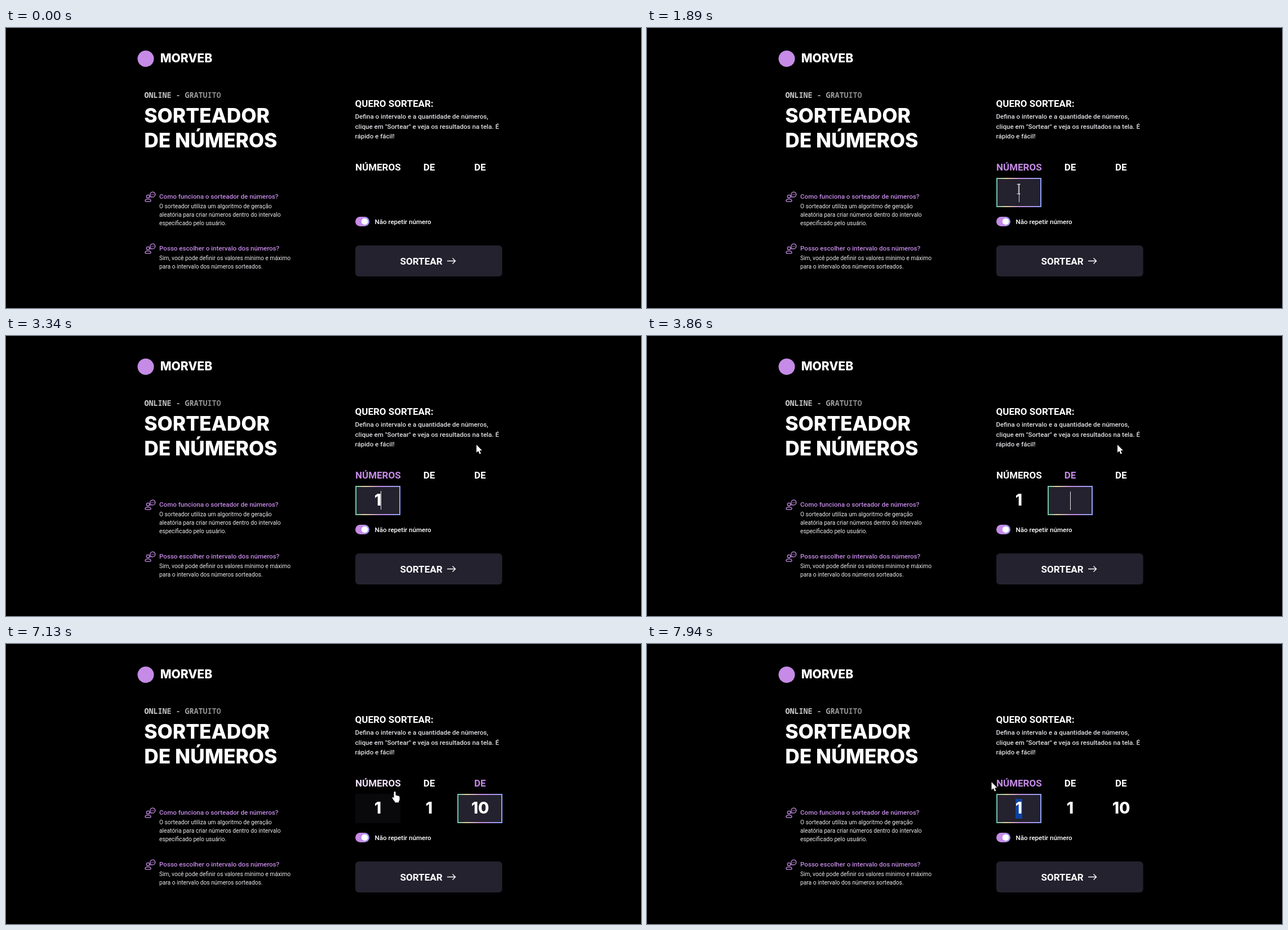
Animation of 1127x497 px, one loop 8 s. Source, as an HTML page:

```html
<!DOCTYPE html>
<html lang="pt-BR">
<head>
<meta charset="utf-8">
<title>Sorteador de números</title>
<style>
  html, body { margin: 0; width: 100%; height: 100%; overflow: hidden; background: #000; }
  svg { display: block; width: 1127px; height: 497px; }
  text { font: 500 11.57px Roboto, "Noto Sans", sans-serif; fill: #e1e1e6; }
  .brand, .title, .digit { font-family: Inter, "Noto Sans", sans-serif; font-weight: 800; fill: #fff; }
  .brand { font-size: 21px; }
  .title { font-size: 35.3px; }
  .digit { font-size: 28px; text-anchor: middle; }
  .tag { font: 600 13.35px "Noto Sans Mono", "DejaVu Sans Mono", monospace; fill: url(#fade); }
  .head { font-size: 17px; font-weight: 700; fill: #fff; }
  .ask { fill: #c58be7; }
  .note { font-size: 10.23px; font-weight: 400; fill: #ececf0; }
  .white { fill: #fff; }
  .label { text-anchor: middle; fill: currentColor; fill-opacity: 1; }
  .icon { fill: none; stroke: #c58be7; stroke-width: 1.3; }
  .panel { fill: #24222e; }
  .ring { fill: none; stroke: url(#rainbow); stroke-width: 2; }

  /* One 8 s timeline: 1% is 80 ms */
  .fade, .move { animation: 8s linear infinite; }
  .step { animation: 8s step-end infinite; }

  .f-a { animation-name: field-a; }
  .f-b { animation-name: field-b; }
  .f-c { animation-name: field-c; }
  @keyframes field-a {
    0%, 12%, 48%, 88.5% { color: #fff; fill-opacity: 0; }
    14.5%, 45.8%, 91%, 100% { color: #c58be7; fill-opacity: 1; }
  }
  @keyframes field-b {
    0%, 25.9%, 31.25%, 45.8%, 71.7%, 100% { color: #fff; fill-opacity: 0; }
    28.2%, 28.9%, 48%, 69.25% { color: #c58be7; fill-opacity: 1; }
  }
  @keyframes field-c {
    0%, 29.1%, 34.8%, 69.25%, 95.6%, 100% { color: #fff; fill-opacity: 0; }
    31.6%, 32.4%, 71.7%, 93% { color: #c58be7; fill-opacity: 1; }
  }

  .r-a { animation-name: ring-a; }
  .r-b { animation-name: ring-b; }
  .r-c { animation-name: ring-c; }
  @keyframes ring-a { 0%, 45.8% { opacity: 0; } 22%, 93%, 100% { opacity: 1; } }
  @keyframes ring-b { 0%, 69.2%, 100% { opacity: 0; } 45.8% { opacity: 1; } }
  @keyframes ring-c { 0%, 93%, 100% { opacity: 0; } 69.2% { opacity: 1; } }

  .d-a { animation-name: digit-a; }
  .d-b { animation-name: digit-b; }
  .d-c { animation-name: digit-c; }
  .d-d { animation-name: digit-d; }
  .mark { animation-name: mark; fill: #0c41a3; }
  @keyframes digit-a { 0% { opacity: 0; } 41.7%, 100% { opacity: 1; } }
  @keyframes digit-b { 0% { opacity: 0; } 59.1%, 100% { opacity: 1; } }
  @keyframes digit-c { 0%, 79.95%, 100% { opacity: 0; } 76.6% { opacity: 1; } }
  @keyframes digit-d { 0% { opacity: 0; } 79.95%, 100% { opacity: 1; } }
  @keyframes mark { 0% { opacity: 0; } 94.5%, 100% { opacity: 1; } }

  .caret { animation-name: caret; fill: #e6e6ea; }
  @keyframes caret {
    0%, 31.85%, 52.45%, 65.7%, 75.85%, 86.6%, 100% { opacity: 0; }
    22%, 38.45% { opacity: 1; transform: translate(660px, 0); }
    41.7% { opacity: 1; transform: translate(665px, -1px); }
    45.8% { opacity: 1; transform: translate(751px, 0); }
    59.1% { opacity: 1; transform: translate(756px, -1px); }
    69.2% { opacity: 1; transform: translate(841px, 0); }
    76.6% { opacity: 1; transform: translate(846px, -1px); }
    79.95% { opacity: 1; transform: translate(857px, -1px); }
  }

  .pointer { animation-name: pointer; fill: #fff; }
  @keyframes pointer {
    0%, 4% { transform: translate(1100px, 476px); }
    5% { transform: translate(1062px, 452px); }
    7.5% { transform: translate(900px, 374px); }
    10% { transform: translate(754px, 333px); }
    11.25% { transform: translate(702px, 320px); }
    12% { transform: translate(676px, 285px); }
    12.6%, 13.5% { transform: translate(663px, 251px); }
    14.4% { transform: translate(663px, 258px); }
    16.1%, 17.9% { transform: translate(663px, 278px); }
    20.25%, 22% { transform: translate(648px, 291px); }
    23.5% { transform: translate(656px, 287px); }
    25% { transform: translate(695px, 275px); }
    27% { transform: translate(745px, 264px); }
    29% { transform: translate(800px, 260px); }
    30.5% { transform: translate(850px, 255px); }
    31.4% { transform: translate(862px, 234px); }
    32.2%, 32.7% { transform: translate(864px, 205px); }
    33.3% { transform: translate(857px, 184px); }
    34% { transform: translate(845px, 176px); }
    34.9%, 85.7% { transform: translate(835px, 193px); }
    87% { transform: translate(800px, 212px); }
    88.2% { transform: translate(722px, 248px); }
    89.1%, 89.5% { transform: translate(690px, 262px); }
    90.2% { transform: translate(680px, 276px); }
    92% { transform: translate(674px, 288px); }
    93% { transform: translate(673px, 290px); }
    94.4% { transform: translate(662px, 289px); }
    95.75% { transform: translate(648px, 281px); }
    96.6% { transform: translate(642px, 275px); }
    98.3% { transform: translate(607px, 247px); }
    99.2%, 100% { transform: translate(611.5px, 245px); }
  }
  .arrow { animation-name: arrow; }
  .hand { animation-name: hand; }
  .beam { animation-name: beam; fill: none; stroke: #fff; }
  @keyframes arrow {
    0%, 11.9%, 25.9%, 88.4% { opacity: 0; }
    4%, 25.4%, 32.1%, 96%, 100% { opacity: 1; }
  }
  @keyframes hand {
    0%, 15%, 32.1%, 89.9%, 100% { opacity: 0; }
    11.9%, 25.9%, 88.4% { opacity: 1; }
  }
  @keyframes beam {
    0%, 25.4%, 96%, 100% { opacity: 0; }
    15%, 89.9% { opacity: 1; }
  }
</style>
</head>
<body>
<svg viewBox="0 0 1127 497">
  <defs>
    <linearGradient id="fade" gradientUnits="userSpaceOnUse" x1="246" x2="382" y1="0" y2="0">
      <stop stop-color="#d2d2d2"/><stop offset="1" stop-color="#808080"/>
    </linearGradient>
    <linearGradient id="rainbow">
      <stop stop-color="#6fc5ab"/><stop offset=".2" stop-color="#e2d49c"/>
      <stop offset=".55" stop-color="#c58be7"/><stop offset="1" stop-color="#91a1fa"/>
    </linearGradient>
    <linearGradient id="switch">
      <stop offset=".4" stop-color="#c58be7"/><stop offset="1" stop-color="#9c97f3"/>
    </linearGradient>
    <g id="talk" class="icon">
      <circle cx="252" cy="299" r="2.7"/>
      <path d="M249.8 303.8h4.4q2.8.6 2.8 2.6t-2.4 1.8h-5.2q-2.4.2-2.4-1.8t2.8-2.6z"/>
      <path d="M256 299.8l.3-2.2a4.5 4.5 0 1 1 2.2 2.1z"/>
      <path d="M258.1 295.5h1M260.1 295.5h1M262.1 295.5h1"/>
    </g>
  </defs>

  <circle cx="248" cy="54.5" r="14.5" fill="#c58be7"/>
  <text class="brand" x="273.7" y="60.5">MORVEB</text>

  <text class="tag" x="245.5" y="123.5">ONLINE - GRATUITO</text>
  <text class="title" x="245.2" y="168">SORTEADOR</text>
  <text class="title" x="245.2" y="211.5">DE NÚMEROS</text>

  <use href="#talk"/>
  <text class="ask" x="272" y="303">Como funciona o sorteador de números?</text>
  <text class="note" x="272" y="320">O sorteador utiliza um algoritmo de geração</text>
  <text class="note" x="272" y="335">aleatória para criar números dentro do intervalo</text>
  <text class="note" x="272" y="350">especificado pelo usuário.</text>

  <use href="#talk" y="92"/>
  <text class="ask" x="272" y="395">Posso escolher o intervalo dos números?</text>
  <text class="note" x="272" y="412">Sim, você pode definir os valores mínimo e máximo</text>
  <text class="note" x="272" y="427">para o intervalo dos números sorteados.</text>

  <text class="head" x="619.5" y="140">QUERO SORTEAR:</text>
  <text x="619.5" y="161">Defina o intervalo e a quantidade de números,</text>
  <text x="619.5" y="178.5">clique em "Sortear" e veja os resultados na tela. É</text>
  <text x="619.5" y="196">rápido e fácil!</text>

  <g class="fade f-a">
    <rect class="panel" x="620" y="266" width="80" height="52"/>
    <text class="head label" x="660.3" y="253">NÚMEROS</text>
  </g>
  <g class="fade f-b">
    <rect class="panel" x="711" y="266" width="80" height="52"/>
    <text class="head label" x="751" y="253">DE</text>
  </g>
  <g class="fade f-c">
    <rect class="panel" x="801" y="266" width="80" height="52"/>
    <text class="head label" x="841.3" y="253">DE</text>
  </g>
  <rect class="ring step r-a" x="621" y="267" width="78" height="50"/>
  <rect class="ring step r-b" x="712" y="267" width="78" height="50"/>
  <rect class="ring step r-c" x="802" y="267" width="78" height="50"/>

  <rect class="step mark" x="654" y="275" width="12" height="35"/>
  <text class="digit step d-a" x="660" y="301">1</text>
  <text class="digit step d-b" x="751" y="301">1</text>
  <text class="digit step d-c" x="841" y="301">1</text>
  <text class="digit step d-d" x="841.5" y="301">10</text>
  <rect class="step caret" y="276" width="1" height="33"/>

  <rect x="620" y="335" width="25" height="17" rx="8.5" fill="url(#switch)"/>
  <circle cx="636.6" cy="343.5" r="5.8" fill="#fff"/>
  <text class="white" x="654.5" y="347.5">Não repetir número</text>

  <rect class="panel" x="620" y="386" width="260.6" height="55" rx="6"/>
  <text class="head" x="699.5" y="419.5">SORTEAR</text>
  <path d="M783 413.5h14.5M792.5 408.5l5 5-5 5" fill="none" stroke="#fff" stroke-width="1.4"/>

  <g class="move pointer">
    <path class="step arrow" d="M0 0v14l3.2-3 2.4 5.4 2.3-1-2.3-5.2h4.3z"/>
    <path class="step hand" d="M-1.5 1.3a1.5 1.5 0 0 1 3 0v5.2l5.2 1.2q1.8.5 1.8 2.3v4q0 1.8-1.5 3.5v1.8h-6.8v-1.5q-2.4-2.4-4.6-6.4 0-2 1.8-1.2l1.1 1.4z"/>
    <path class="step beam" d="M-3 -8.5h2.5q.5 0 .5.5t.5-.5h2.5M0 -8v16M-3 8.5h2.5q.5 0 .5-.5t.5.5h2.5"/>
  </g>
</svg>
</body>
</html>
```
